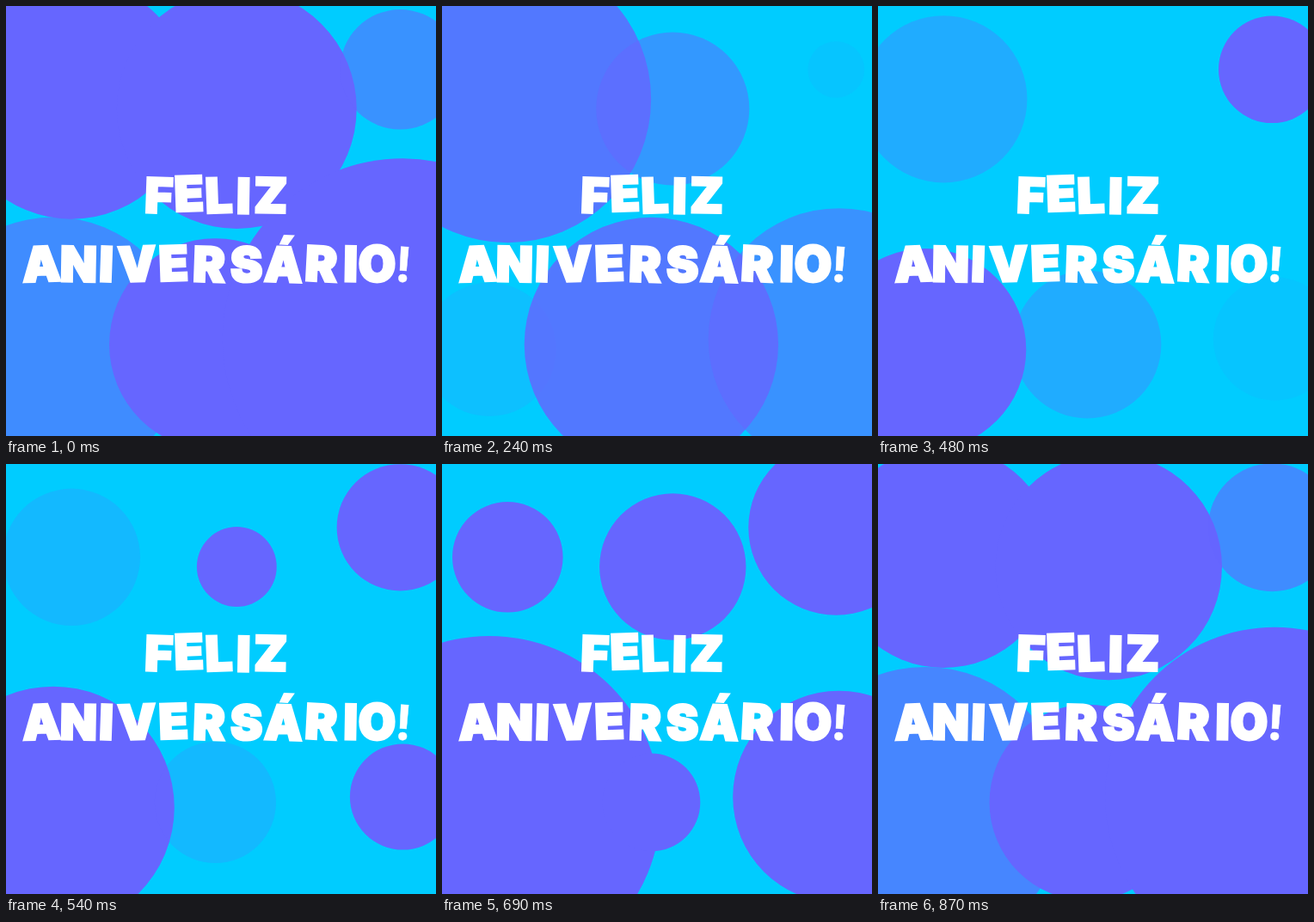
These frames come from a looping animation (500x500 px, 0.9 s). An HTML page:

```html
<!DOCTYPE html>
<html lang="pt">
<head>
<meta charset="utf-8">
<title>Feliz aniversário!</title>
<style>
  html, body { margin: 0; width: 100%; height: 100%; overflow: hidden; background: #00ccff; }
  svg { display: block; width: 100vw; height: 100vh; }
  circle { fill: #6666ff; }
  text {
    font: 900 56px Inter, "Open Sans", sans-serif;
    fill: #fff;
    stroke: #fff;
    stroke-width: 2.8;
    text-anchor: middle;
  }
  .thin { font-weight: 700; stroke-width: 0.5; }
</style>
</head>
<body>
<svg viewBox="0 0 500 500">
  <g id="bubbles"></g>
  <text x="177 213.5 248 276 307.5" y="240 239 241 241 240"
        rotate="2 -2 -2 1 1">FELIZ</text>
  <text x="42 84 116 153 195.5 235.5 280 322 365.5 400.5 431.5 461"
        y="321 320 320 321 320 320 321 320 319 320 320 320"
        rotate="-2 1 2 -2 -2 2 -1 2 3 1 0 4">ANIVERSÁRIO<tspan class="thin">!</tspan></text>
</svg>
<script>
const LOOP = 900, STEP = 30;
const GROW = 390, FADE = 480;
const MIN = 0.2775;

// centre, largest radius, time of the largest radius
const bubbles = [
  { x: 76.3, y: 108.3, r: 193, peak: 150 },
  { x: 268.3, y: 119.5, r: 139.4, peak: 0 },
  { x: 458.3, y: 73.8, r: 102, peak: 690 },
  { x: 55, y: 399.4, r: 211.2, peak: 720 },
  { x: 243.4, y: 393.5, r: 170.8, peak: 150 },
  { x: 461.5, y: 387, r: 222, peak: 30 }
];

const group = document.getElementById("bubbles");
for (const b of bubbles) {
  b.el = document.createElementNS("http://www.w3.org/2000/svg", "circle");
  b.el.setAttribute("cx", b.x);
  b.el.setAttribute("cy", b.y);
  group.appendChild(b.el);
}

// Fade and shrink after the peak, then pop back in and grow.
function pose(age) {
  if (age <= FADE) {
    const k = age / FADE;
    return { scale: 1 - (1 - MIN) * k, alpha: 1 - k };
  }
  return { scale: 1 - (1 - MIN) * (LOOP - age) / GROW, alpha: 1 };
}

function draw(time) {
  const t = Math.floor((time % LOOP) / STEP) * STEP;
  for (const b of bubbles) {
    const { scale, alpha } = pose((t - b.peak + LOOP) % LOOP);
    b.el.setAttribute("r", (b.r * scale).toFixed(2));
    b.el.setAttribute("opacity", alpha.toFixed(4));
  }
}

let start = null;
function tick(now) {
  if (start === null) start = now;
  draw(now - start);
  requestAnimationFrame(tick);
}
draw(0);
requestAnimationFrame(tick);
</script>
</body>
</html>
```
